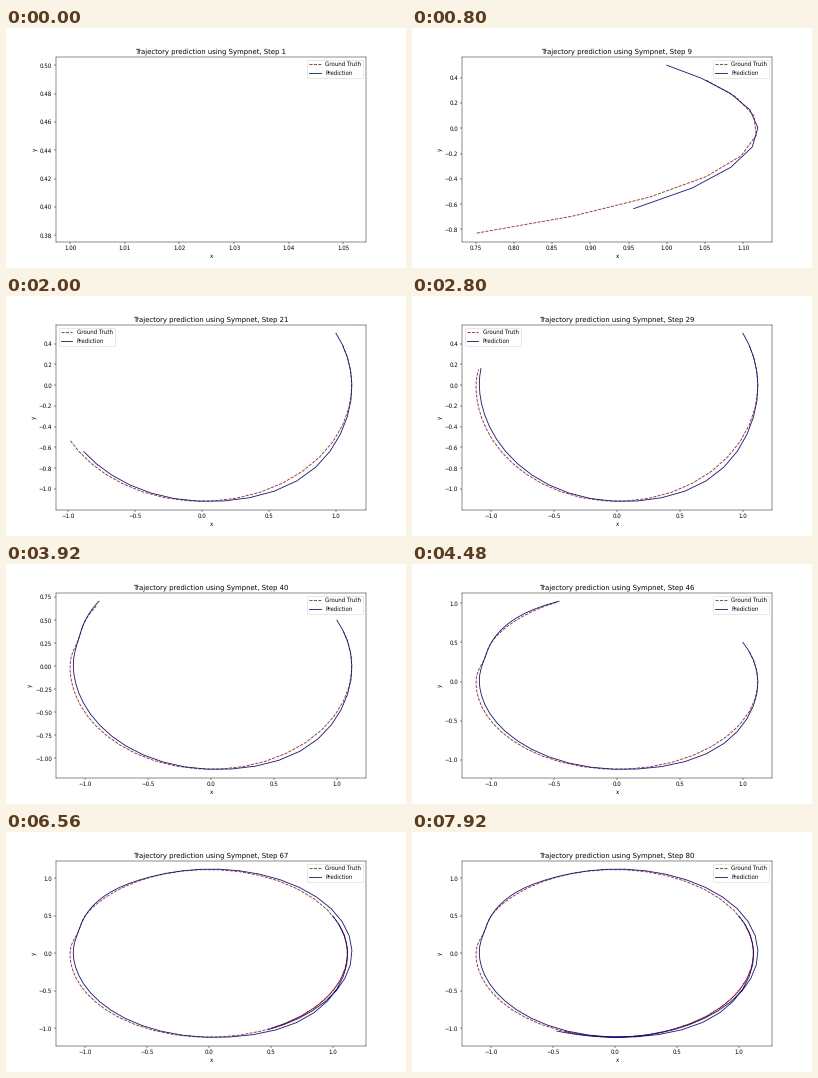
Write a matplotlib script that moves like this. It is 400 px wide and 240 px high and loops after 8 s.

```python
import numpy as np
import matplotlib.pyplot as plt
from matplotlib.animation import FuncAnimation

plt.rcParams["font.family"] = "DejaVu Sans"
plt.rcParams["text.hinting"] = "none"

FRAMES, INTERVAL, STEP_MS = 100, 80, 100
STEPS = 80
START = np.degrees(np.arctan2(0.5, 1.0))


def sweep(n, rate, swing, period, lead):
    """Clockwise degrees covered after n steps: steady turning plus a swing."""
    w = 2 * np.pi / period
    return rate * n + swing * (np.cos(w * lead) - np.cos(w * (n + lead)))


def bump(angle, height, centre, width):
    return height * np.exp(-((angle - centre) / width) ** 2)


def to_xy(angle, r):
    a = np.radians(START - angle)
    return r * np.cos(a), r * np.sin(a)


n = np.arange(STEPS + 1)

true_angle = sweep(n, rate=5.9, swing=27.4, period=46, lead=0.928)
true_r = 1.1186 + bump(true_angle, -0.028, 222, 8)
true_x, true_y = to_xy(true_angle, true_r)

# the prediction drifts out on the right and in on the left
pred_angle = sweep(n, rate=6.06, swing=26, period=44, lead=-1)
pred_r = (np.sqrt(1.25)
          + bump(pred_angle, 0.045, 77, 27)
          + bump(pred_angle, -0.031, 185, 50)
          + bump(pred_angle, -0.012, 222, 9)
          + bump(pred_angle, 0.025, 250, 18)
          + bump(pred_angle, 0.038, 372, 58)
          + bump(pred_angle, 0.030, 511, 15))
pred_x, pred_y = to_xy(pred_angle, pred_r)

fig, ax = plt.subplots(figsize=(10, 6), dpi=40)
true_line, = ax.plot([], [], "--", color="#a81c10", label="Ground Truth")
pred_line, = ax.plot([], [], "-", color="#0a0f9c", label="Prediction")
ax.set_xlabel("x")
ax.set_ylabel("y")
ax.legend(loc="best")
title = ax.set_title("", fontsize=12.3)


def draw(frame):
    step = min(1 + round(frame * INTERVAL / STEP_MS), STEPS)
    # the prediction runs one step behind the truth
    true_line.set_data(true_x[1:step + 1], true_y[1:step + 1])
    pred_line.set_data(pred_x[:step], pred_y[:step])
    ax.relim()
    ax.autoscale_view()
    title.set_text(f"Trajectory prediction using Sympnet, Step {step}")
    return true_line, pred_line, title


anim = FuncAnimation(fig, draw, frames=FRAMES, interval=INTERVAL,
                     init_func=lambda: draw(0), repeat=True, repeat_delay=0)
plt.show()
```
